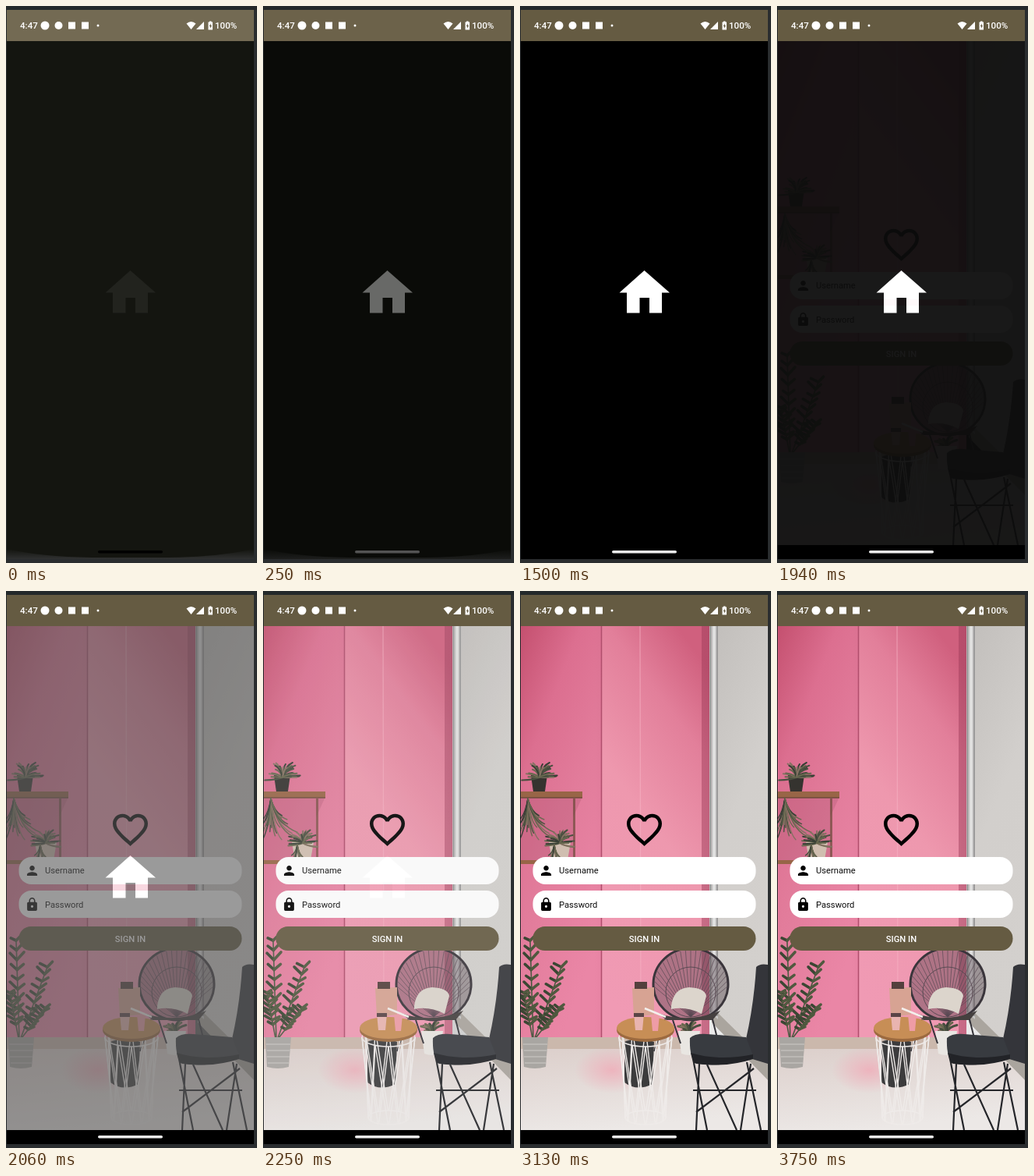
Write an HTML page that moves like this. It is 322x714 px and loops after 4.06 s.

```html
<!DOCTYPE html>
<html lang="en">
<head>
<meta charset="utf-8">
<style>
  html, body { margin: 0; width: 100%; height: 100%; overflow: hidden; background: #2a2d2f; }
  svg { display: block; width: 322px; height: 714px; }
  text { font: 11.2px Roboto, sans-serif; }
  .status text { font: 500 11.6px Roboto, sans-serif; }
</style>
</head>
<body>
<svg viewBox="0 0 322 714">
  <defs>
    <linearGradient id="wall" x2=".5" y2="1">
      <stop stop-color="#c4506f"/><stop offset=".3" stop-color="#dc6f90"/><stop offset=".6" stop-color="#e27c9b"/><stop offset="1" stop-color="#ea86a6"/>
    </linearGradient>
    <linearGradient id="panel" x1=".7" x2=".35" y2="1">
      <stop stop-color="#d0607e"/><stop offset=".2" stop-color="#e27f9a"/><stop offset=".5" stop-color="#ee98ae"/><stop offset="1" stop-color="#f09ab4"/>
    </linearGradient>
    <linearGradient id="shade">
      <stop stop-color="#9c3a58" stop-opacity="0"/><stop offset="1" stop-color="#9c3a58" stop-opacity=".5"/>
    </linearGradient>
    <linearGradient id="glass" x2=".3" y2="1">
      <stop stop-color="#c1bebb"/><stop offset=".5" stop-color="#d2cfcc"/><stop offset="1" stop-color="#d3d0cd"/>
    </linearGradient>
    <linearGradient id="floor" x2=".3" y2="1">
      <stop stop-color="#dccfcb"/><stop offset="1" stop-color="#ece8e6"/>
    </linearGradient>
    <radialGradient id="blush">
      <stop stop-color="#f2a5b4" stop-opacity=".7"/><stop offset="1" stop-color="#f2a5b4" stop-opacity="0"/>
    </radialGradient>
    <linearGradient id="glow" x2="0" y2="1">
      <stop stop-color="#2c2d2d" stop-opacity="0"/><stop offset="1" stop-color="#303131"/>
    </linearGradient>
    <clipPath id="view"><path d="M1 45H318V691H1z"/></clipPath>
  </defs>

  <path d="M0 0H322V5H0z" fill="#24292b"/>
  <path d="M1 45H318V709H1z"/>
  <path id="backdrop" d="M1 45H318V709H1z"/>
  <path id="veil" d="M1 45H318V691H1z"/>
  <path id="corners" d="M1 696Q45 706 110 707H210Q275 706 318 696V709H1z" fill="url(#glow)"/>
  <path id="house" fill="#fff" d="M159.5 339L192 367.5H182V393.5H166V374H153.5V393.5H137V367.5H127.5z"/>

  <g id="login" clip-path="url(#view)">
    <g id="room">
      <path d="M1 45H104V573H1z" fill="url(#wall)"/>
      <path d="M104 45H243V573H104z" fill="url(#panel)"/>
      <path d="M95 45H104V573H95zM233 45H243V573H233z" fill="url(#shade)"/>
      <path d="M104.500 45V573" stroke="#b04e6c" stroke-width="1.5"/>
      <path d="M154 45L155 573" stroke="#f6b2c3" stroke-width="1.2" opacity=".6"/>
      <path d="M1 572H250V588H1z" fill="#cbb8ac"/>
      <path d="M1 587H318V691H1z" fill="url(#floor)"/>
      <ellipse cx="118" cy="614" rx="48" ry="30" fill="url(#blush)"/>
      <path d="M243 45H318V625L243 545z" fill="url(#glass)"/>
      <path d="M246 533L318 604V627L246 553z" fill="#aaa59e"/>
      <path d="M243 45H254V549L243 540z" fill="#c6c5c4"/>
      <path d="M244.500 45V540M253 45V545" stroke="#8f8d8d" stroke-width="1.5"/>
      <path d="M249 45V540" stroke="#e4e4e3" stroke-width="3"/>
      <path d="M1 264H80L68 290V345H1z" fill="#8c3f55" opacity=".2"/>
      <path d="M1 257H80V265H1zM1 345H72V350H1z" fill="#986547"/>
      <path d="M1 264H80V266H1zM68 266H71V345H68z" fill="#6b4938" opacity=".7"/>
      <path d="M14 236H35L32 257H17z" fill="#35332f"/>
      <path d="M37 322H65L61 345H41z" fill="#d0beb0"/>
    </g>
    <g id="plants" fill="none" stroke-linecap="round"></g>
    <g>
      <path d="M3 572H36L33 610Q19 614 5 610z" fill="#a9a6a2"/>
      <path d="M4 581H35M5 589H35M5 597H34M6 605H33" stroke="#bbb8b4" stroke-width="2"/>
      <path d="M203 564H231L227 593Q217 597 207 593z" fill="#e9e6e2"/>
    </g>
    <g id="wires" fill="none"></g>
    <path d="M194 532Q197 509 217 508Q237 509 239 519L233 542Q213 532 194 536z" fill="#dcd5cc"/>
    <path d="M177 541Q215 555 257 538L247 550H188z" fill="#45403f"/>
    <path d="M186 549L172 590M247 549L256 585M196 550L206 580" stroke="#35343a" stroke-width="2"/>
    <path d="M134 578Q152 570 172 578L170 632Q150 642 134 630z" fill="#3c3c3d"/>
    <g id="basket" fill="none" stroke="#efebe9" stroke-width="1.4"></g>
    <ellipse cx="161" cy="563" rx="37" ry="15" fill="#9c6a3f"/>
    <ellipse cx="161" cy="560" rx="37" ry="14" fill="#c78e56"/>
    <path d="M144 509L172 508V543L146 546z" fill="#d7a393"/>
    <path d="M147 501H163V510H147z" fill="#54403d"/>
    <path d="M146 542H159L157 563H148z" fill="#e9b4b0"/>
    <path d="M168 543H179L177 564H170z" fill="#ee9ca6"/>
    <path d="M146 541H159V546H146z" fill="#5b4547"/>
    <path d="M160 535L187 546" stroke="#f4efec" stroke-width="2.500"/>
    <path d="M223 605L240 691M230 606L226 691M296 606L283 691M291 604L309 691M240 607L278 691M222 640H303M226 668L300 612" fill="none" stroke="#25262a" stroke-width="2.200"/>
    <path d="M303 482Q308 477 318 479V606L288 597Q285 588 290 574Q300 530 303 482z" fill="#34353a"/>
    <path d="M218 573Q224 567 240 568L290 572L300 598Q262 611 226 606Q217 598 218 573z" fill="#383b40"/>
    <path d="M219 592Q255 603 299 594V600Q262 612 222 605z" fill="#222327"/>

    <g fill="#fff"><rect x="16.500" y="341" width="286" height="35" rx="16"/><rect x="16.500" y="384" width="286" height="35" rx="16"/></g>
    <rect x="16.500" y="430" width="286" height="31" rx="15.500" fill="#655b42"/>
    <path transform="translate(132.500 279) scale(2.250)" d="M16.500 3c-1.740 0-3.410.81-4.500 2.090C10.910 3.810 9.240 3 7.500 3 4.420 3 2 5.420 2 8.500c0 3.780 3.400 6.860 8.550 11.540L12 21.350l1.450-1.320C18.600 15.360 22 12.280 22 8.500 22 5.420 19.580 3 16.500 3zm-4.400 15.550l-.1.1-.1-.1C7.140 14.240 4 11.390 4 8.500 4 6.500 5.500 5 7.500 5c1.540 0 3.040.99 3.570 2.360h1.870C13.460 5.990 14.960 5 16.500 5c2 0 3.500 1.500 3.500 3.500 0 2.890-3.140 5.740-7.900 10.050z"/>
    <path transform="translate(23.700 348.700) scale(.82)" d="M12 12c2.210 0 4-1.790 4-4s-1.790-4-4-4-4 1.790-4 4 1.790 4 4 4zm0 2c-2.670 0-8 1.340-8 4v2h16v-2c0-2.660-5.330-4-8-4z"/>
    <path transform="translate(23.900 392.300) scale(.8)" d="M18 8h-1V6c0-2.760-2.240-5-5-5S7 3.240 7 6v2H6c-1.100 0-2 .9-2 2v10c0 1.100.9 2 2 2h12c1.100 0 2-.9 2-2V10c0-1.100-.9-2-2-2zm-6 9c-1.100 0-2-.9-2-2s.9-2 2-2 2 .9 2 2-.9 2-2 2zm3.100-9H8.900V6c0-1.710 1.390-3.100 3.100-3.100s3.100 1.390 3.100 3.100v2z"/>
    <g fill="#0c0c0c"><text x="50" y="362">Username</text><text x="50" y="405.500">Password</text></g>
    <text x="159.500" y="449.500" fill="#fff" text-anchor="middle" style="font-weight:500">SIGN IN</text>
  </g>

  <path d="M1 5H318V45H1z" fill="#655b42"/>
  <path id="shine" d="M1 5H318V45H1z" fill="#fff"/>
  <g class="status" fill="#fff">
    <text x="18" y="29">4:47</text>
    <text x="268" y="29">100%</text>
    <circle cx="50" cy="25" r="5.500"/>
    <circle cx="67.500" cy="25" r="5"/>
    <rect x="80" y="20.500" width="9" height="9"/>
    <rect x="97" y="20.500" width="9" height="9"/>
    <circle cx="118" cy="25" r="1.500"/>
    <path d="M231.500 22.500Q237.500 17.500 243.500 22.500L237.500 30z"/>
    <path d="M254 20V30H244z"/>
    <path d="M261 19.500H263.500V20.500H265V30.500H259.500V20.500H261z"/>
    <path d="M262.800 22.500L260.800 26H262V28.800L264 25H262.800z" fill="#655b42"/>
  </g>
  <rect id="pill" x="118" y="698" width="83" height="3.500" rx="1.750"/>
</svg>

<script>
const LOOP = 4060, TICK = 62.5;
const $ = id => document.getElementById(id);
const clamp = x => Math.min(1, Math.max(0, x));

let seed = 7;
const random = () => (seed = seed * 16807 % 2147483647) / 2147483647;
const between = (a, b) => a + (b - a) * random();
const stroke = (d, color, width) => `<path d="${d}" stroke="${color}" stroke-width="${width}"/>`;

// Short curved leaves growing out of one point, within a range of angles.
function tuft(x, y, count, length, from, to, width) {
  const greens = ['#4a5040', '#68684f', '#373f35', '#857262'];
  let out = '';
  for (let i = 0; i < count; i++) {
    const angle = between(from, to), r = length * between(.45, 1);
    const dx = Math.cos(angle) * r, dy = Math.sin(angle) * r;
    out += stroke(`M${x} ${y}q${dx * .3} ${dy * .8} ${dx} ${dy}`, greens[i % 4], width);
  }
  return out;
}

// A stem with paired, slightly irregular leaves.
function frond(x, y, tipX, tipY) {
  let out = stroke(`M${x} ${y}L${tipX} ${tipY}`, '#4b5a42', 1.6);
  for (let k = .3; k <= 1; k += .1) {
    const px = x + (tipX - x) * k, py = y + (tipY - y) * k;
    for (const side of [-1, 1]) {
      const r = between(5, 10);
      out += stroke(`M${px} ${py}l${side * r} ${-r * between(.4, 1.1)}`, side < 0 ? '#3b4633' : '#50593f', 3.6);
    }
  }
  return out;
}

$('plants').innerHTML =
  tuft(25, 239, 34, 24, -3.3, .2, 2) +
  tuft(10, 266, 26, 58, .9, 2, 1.4) +
  tuft(51, 323, 34, 20, -3.4, .3, 2) +
  tuft(44, 325, 14, 34, 1.1, 2.1, 1.4) +
  tuft(217, 566, 18, 17, -3.1, 0, 3) +
  frond(17, 573, 13, 448) + frond(19, 573, 53, 482) + frond(20, 573, 50, 535) + frond(16, 573, 5, 515);

let wires = '<ellipse cx="219" cy="504" rx="48" ry="46" fill="#4b3a44" fill-opacity=".4" stroke="#3a353b" stroke-width="3"/>';
for (let i = 0; i < 23; i++) {
  const a = Math.PI * (1 + i / 22);
  wires += stroke(`M219 546L${219 + 47 * Math.cos(a)} ${507 + 47 * Math.sin(a)}`, '#5a4a53', .7);
}
wires += '<ellipse cx="219" cy="514" rx="32" ry="32" stroke="#5a4a53"/>';
$('wires').innerHTML = wires;

let basket = '<ellipse cx="161" cy="675" rx="26" ry="9"/><ellipse cx="161" cy="572" rx="34" ry="12"/>';
for (let i = 0; i < 12; i++) {
  const a = i * Math.PI / 6;
  for (const turn of [-.5, .5])
    basket += `<path d="M${161 + 34 * Math.cos(a)} ${572 + 12 * Math.sin(a)}L${161 + 26 * Math.cos(a + turn)} ${675 + 9 * Math.sin(a + turn)}"/>`;
}
$('basket').innerHTML = basket;

function draw(time) {
  const t = Math.floor((time % LOOP + 5) / TICK) * TICK;
  const launch = 1 - clamp(t / 500);
  const icon = 1 - (1 - clamp((t + 40) / 1350)) ** 2;
  const reveal = clamp((t - 1918) / 375);
  const grey = level => `rgb(${level},${level},${level})`;

  $('backdrop').setAttribute('fill', `rgb(${20 * launch},${21 * launch},${16 * launch})`);
  $('corners').setAttribute('opacity', launch);
  $('shine').setAttribute('opacity', .09 * launch);
  $('house').setAttribute('opacity', icon);
  $('pill').setAttribute('fill', grey(240 * (icon - .058) / .942));
  $('veil').setAttribute('fill', grey(235 * reveal));
  $('veil').setAttribute('opacity', reveal > 0 ? 1 : 0);
  $('login').setAttribute('opacity', reveal);
}

const start = performance.now();
function loop() {
  draw(performance.now() - start);
  requestAnimationFrame(loop);
}
loop();
</script>
</body>
</html>
```
